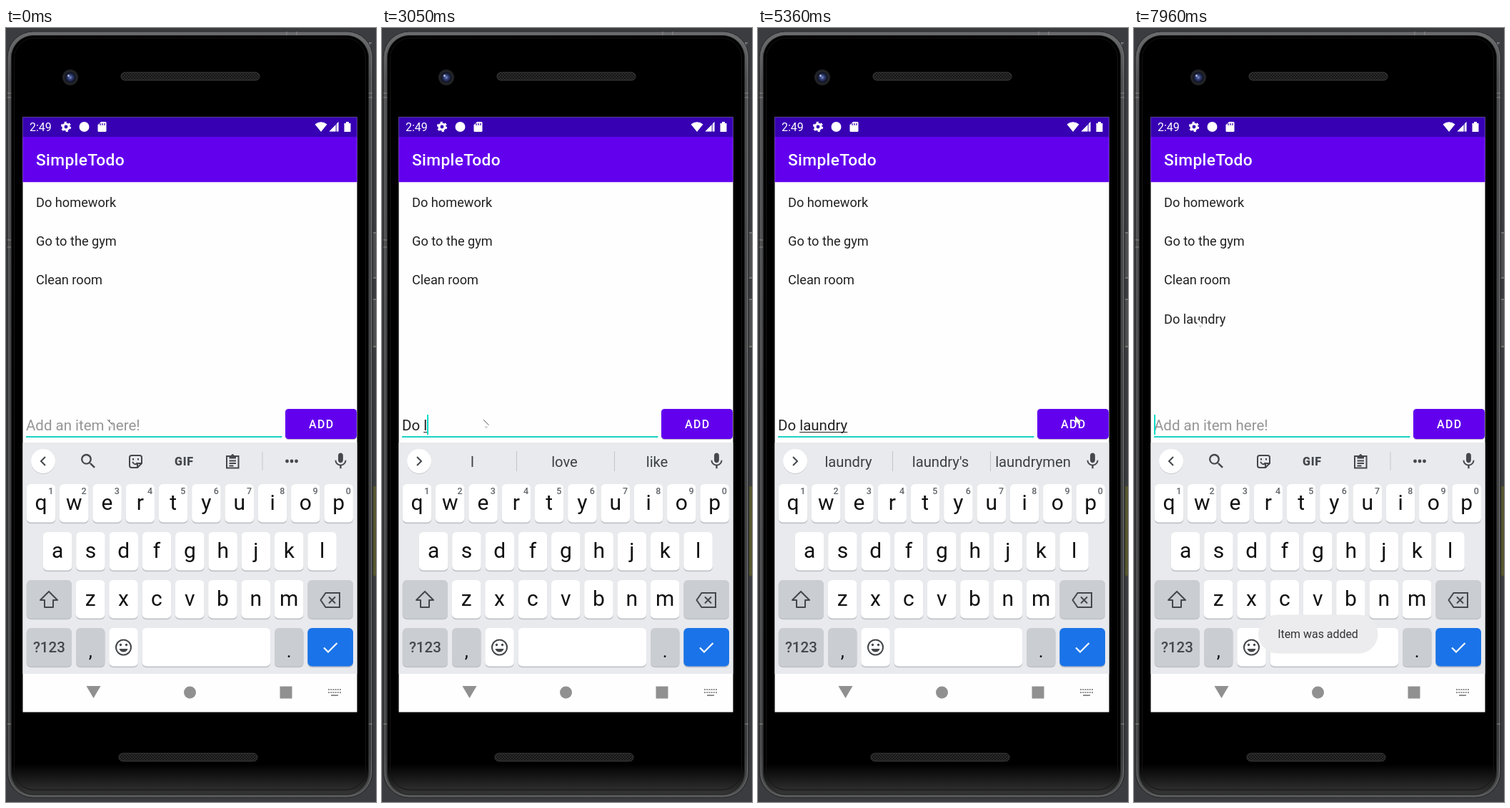
An HTML page for the animation above (8 s loop, 518 px wide and 1081 px high).

```html
<!DOCTYPE html>
<html lang="en">
<head>
<meta charset="utf-8">
<title>Todo list</title>
<style>
html, body { margin: 0; width: 100%; height: 100%; overflow: hidden; background: #3b3c3f; }
#stage { position: absolute; left: 0; top: 0; width: 518px; height: 1081px; overflow: hidden; font-family: Roboto, sans-serif; }
svg { position: absolute; left: 0; top: 0; }
text { font-family: Roboto, sans-serif; }
.mid { text-anchor: middle; }
.line { fill: none; stroke: #44474b; stroke-width: 2; }
#field { position: absolute; left: 28px; top: 541px; font-size: 20.48px; line-height: 28px; color: #212121; white-space: pre; }
#field u { text-decoration-thickness: 1px; text-underline-offset: 2px; text-decoration-skip-ink: none; }
#hint { position: absolute; left: 0; top: 0; color: #959595; }
#caret { position: absolute; top: -1px; width: 2px; height: 28px; background: #03dac5; }
</style>
</head>
<body>
<div id="stage">
<svg width="518" height="1081" viewBox="0 0 518 1081">
  <defs>
    <linearGradient id="metal" x2="0" y2="1">
      <stop offset="0" stop-color="#6c6d6e"/><stop offset=".06" stop-color="#4c4d4e"/>
      <stop offset=".5" stop-color="#424344"/><stop offset=".94" stop-color="#3a3b3c"/>
      <stop offset="1" stop-color="#4c4d4e"/>
    </linearGradient>
    <linearGradient id="glass" x2="0" y2="1">
      <stop offset=".96" stop-color="#000"/><stop offset="1" stop-color="#363636"/>
    </linearGradient>
    <radialGradient id="lens">
      <stop offset="0" stop-color="#7a8cc4"/><stop offset=".45" stop-color="#2c3a70"/><stop offset="1" stop-color="#0c0d16"/>
    </radialGradient>
    <pattern id="mesh" width="4" height="4" patternUnits="userSpaceOnUse">
      <rect width="4" height="4" fill="#161616"/><path d="M0 0L4 4M4 0L0 4" stroke="#333" stroke-width=".7"/>
    </pattern>
    <clipPath id="btnClip"><rect x="391" y="532" width="100" height="42" rx="4.5"/></clipPath>
  </defs>

  <!-- phone body -->
  <path d="M514 640h4v125h-4z" fill="#55552f"/>
  <text x="499" y="28" font-size="15" fill="#8d8f9a">ur</text>
  <path d="M512 285h6v65h-6zM512 378h6v68h-6z" fill="#4e4e4e"/>
  <path d="M514 286h4M514 349h4M514 379h4M514 445h4" stroke="#999"/>
  <rect x="2" y="5" width="511.500" height="1070" rx="36" fill="url(#metal)" stroke="#29292a"/>
  <rect x="4" y="7" width="507.500" height="1066" rx="34" fill="none" stroke="#6a6b6c"/>
  <path d="M2 91h6M2 97h6M507 91h6M507 97h6M393 5v5M407 5v5M2 296h6M2 306h6M2 972h6M507 972h6" stroke="#8a8a8a"/>
  <rect x="7.500" y="10.500" width="500" height="1060" rx="31" fill="url(#glass)" stroke="#222"/>
  <rect x="11.500" y="14" width="492" height="1050" rx="28" fill="none" stroke="#151515"/>
  <circle cx="90" cy="69" r="11" fill="#222327"/><circle cx="90" cy="69" r="7.500" fill="url(#lens)"/>
  <circle cx="87.500" cy="66.500" r="1.500" fill="#b4c0dc"/>
  <g fill="url(#mesh)" stroke="#3d3d3d">
    <rect x="161" y="62" width="194" height="11" rx="5.500"/><rect x="158" y="1013" width="194" height="11" rx="5.500"/>
  </g>

  <!-- app -->
  <path d="M23.500 124.500h468v831h-468z" fill="#fefefe"/>
  <path d="M23.500 124.500h468v28h-468z" fill="#3700b3"/>
  <path d="M23.500 152h468v63.300h-468z" fill="#6200ee"/>
  <g fill="#fff">
    <text x="33" y="144" font-size="16">2:49</text>
    <circle cx="84" cy="138" r="4" fill="none" stroke="#fff" stroke-width="3.200"/>
    <circle cx="84" cy="138" r="6.200" fill="none" stroke="#fff" stroke-width="2" stroke-dasharray="3.250"/>
    <circle cx="109.500" cy="138" r="7"/>
    <path d="M133 131h6q1.500 0 1.500 1.500v11q0 1.500-1.500 1.500h-9q-1.500 0-1.500-1.500V135.500z"/>
    <path d="M432.500 134.500Q441 128 449.500 134.500L441 145zM473.500 133h2.500v-2h4v2h2.500v12h-9z"/>
    <path d="M452.500 144.500L465.500 131v13.500z" fill-opacity=".35"/><path d="M452.500 144.500l9-9.300v9.300zM463 133.500l2.500-2.500v13.500H463z"/>
    <text x="42" y="192" font-size="22.750" font-weight="500" letter-spacing=".35">SimpleTodo</text>
  </g>
  <path d="M132 133v3M135 133v3M138 133v3" stroke="#3700b3" stroke-width="1.200"/>
  <g id="list" font-size="18.200" fill="#212121"></g>

  <!-- entry row -->
  <rect x="28" y="570" width="358.500" height="2" fill="#1bd2c3"/>
  <rect id="lift" x="392" y="536" width="99" height="41" rx="5" fill="#000" fill-opacity=".2"/>
  <rect x="391" y="533" width="100" height="42" rx="4.500" fill="#000" fill-opacity=".25"/>
  <rect x="391" y="532" width="100" height="42" rx="4.500" fill="#6200ee"/>
  <circle id="ripple" cx="444" cy="545" fill="#fff" clip-path="url(#btnClip)"/>
  <text x="424" y="559" font-size="15.930" font-weight="500" letter-spacing="1.420" fill="#fff">ADD</text>

  <!-- keyboard -->
  <path d="M23.500 579h468v323h-468z" fill="#e8eaed"/>
  <circle cx="52" cy="606" r="17" fill="#c9cbcf"/><circle cx="52" cy="605" r="17" fill="#fff"/>
  <path id="chevron" class="line"/>
  <g id="tools">
    <path transform="translate(101.600 591.500) scale(1.138)" fill="#44474b" d="M15.500 14h-.8l-.3-.27A6.500 6.500 0 1 0 13.700 14.400l.3.300v.8l5 5L20.500 19zM9.500 14a4.500 4.500 0 1 1 0-9 4.500 4.500 0 0 1 0 9z"/>
    <path d="M176 597h11q3 0 3 3v8l-6 6h-8q-3 0-3-3v-11q0-3 3-3zM190 608h-4q-2 0-2 2v4M177 606q4 6 7 1" class="line"/>
    <path d="M177 601h2v2.500h-2zM184 601h2v2.500h-2z" fill="#44474b"/>
    <text x="249.400" y="610.500" font-size="16" font-weight="800" letter-spacing=".8" class="mid" fill="#44474b">GIF</text>
    <path d="M309 598h16.500v16.500H309zM312.500 604.500h9.500M312.500 608h9.500M312.500 611.500h6" class="line"/>
    <path d="M312.500 597h2.500q2-4 4.500 0h2.500v4.500h-9.500z" fill="#44474b"/>
    <path d="M359 592v26" stroke="#c6c8cc"/>
    <path d="M393.500 605h.01M400 605h.01M406.500 605h.01" stroke="#44474b" stroke-width="4.800" stroke-linecap="round"/>
  </g>
  <g id="words" font-size="20.200" fill="#3c4043">
    <path d="M188.500 591v28M325.500 591v28" stroke="#c3c5c9"/>
    <text x="126.500" y="613" class="mid"></text><text x="255.500" y="613" class="mid"></text><text x="385" y="613" class="mid"></text>
  </g>
  <path transform="translate(454.800 591.300) scale(1.138)" fill="#44474b" d="M12 14c1.660 0 3-1.340 3-3V5c0-1.660-1.340-3-3-3S9 3.340 9 5v6c0 1.660 1.340 3 3 3zm5.300-3c0 3-2.540 5.100-5.300 5.100S6.700 14 6.700 11H5c0 3.410 2.720 6.230 6 6.720V21h2v-3.280c3.280-.48 6-3.300 6-6.720z"/>
  <g id="keys"></g>
  <path d="M60 787l12 12h-6v10H54v-10h-6z" class="line" stroke-linejoin="round"/>
  <path d="M447.500 789H467v20h-19.500l-7-10zM452 794.500l9 9M461 794.500l-9 9" class="line"/>
  <circle cx="164.500" cy="865" r="10.500" class="line"/>
  <path d="M158.500 867h12q-1.500 4.500-6 4.500t-6-4.500z" fill="#44474b"/>
  <circle cx="160.500" cy="861.500" r="1.700" fill="#44474b"/><circle cx="168.500" cy="861.500" r="1.700" fill="#44474b"/>
  <path d="M445 865.500l6 6 12.500-12.500" fill="none" stroke="#fff" stroke-width="2.200"/>

  <!-- navigation -->
  <g fill="#909090">
    <path d="M112.500 919h20l-10 17z"/><circle cx="257.500" cy="928" r="8.500"/><path d="M383.500 919.500h17v17h-17z"/>
  </g>
  <path d="M451 924h18M451 928h18" stroke="#909090" stroke-width="2" stroke-dasharray="2 1.200"/>
  <path d="M455 932h10" stroke="#909090" stroke-width="2"/>

  <g id="toast">
    <rect x="174" y="819.500" width="167.500" height="54" rx="27" fill="#ececee"/>
    <text x="257.500" y="852" font-size="15.930" class="mid" fill="#333">Item was added</text>
  </g>
</svg>
<div id="field"><span id="hint">Add an item here!</span><span id="done"></span><u id="word"></u><span id="gap"></span><span id="caret"></span></div>
<svg width="518" height="1081">
  <g id="mouse">
    <path d="M0 0V11L2.500 8.800 4.200 12.500 6 11.700 4.500 8.200H8z" fill="#fff"/>
    <path d="M.5 .5L8 8.200" stroke="#4a4a4a" stroke-width=".9"/>
    <path d="M3 9.500l1 2M5 9.500l1 1.500M4 12h1.500" stroke="#aaa" stroke-width=".9"/>
  </g>
</svg>
</div>
<script>
const $ = id => document.getElementById(id);
const show = (el, on) => { el.style.display = on ? '' : 'none'; };

['Do homework', 'Go to the gym', 'Clean room', 'Do laundry'].forEach((s, i) => {
  $('list').innerHTML += `<text x="42" y="${249.55 + i * 54.4}">${s}</text>`;
});
const added = $('list').lastChild;

function key(x, y, w, fill = '#fff', label = '', size = 30, dy = 36) {
  return `<rect x="${x}" y="${y + 1.2}" width="${w}" height="54" rx="6" fill="#bfc2c6"/>
    <rect x="${x}" y="${y}" width="${w}" height="53.5" rx="6" fill="${fill}"/>
    <text x="${x + w / 2}" y="${y + dy}" class="mid" font-size="${size}" fill="#111">${label}</text>`;
}
const STEP = 46.3, W = 40.5, GREY = '#cacdd2';
let board = '';
[['qwertyuiop', 28.7, 637], ['asdfghjkl', 51.9, 704], ['zxcvbnm', 98, 771]].forEach(([row, x0, y], r) => {
  [...row].forEach((c, i) => {
    board += key(x0 + i * STEP, y, W, '#fff', c);
    if (!r) board += `<text x="${x0 + i * STEP + 34}" y="651" class="mid" font-size="12.5" font-weight="500" fill="#5f6368">${(i + 1) % 10}</text>`;
  });
});
board += key(28.7, 771, 63.3, GREY) + key(422.3, 771, 63.7, GREY)
  + key(28.7, 838, 63.3, GREY, '<tspan font-weight="500" fill="#44474b">?123</tspan>', 20.5, 34)
  + key(98, 838, W, GREY, ',', 26, 41) + key(144.3, 838, W)
  + key(190.6, 838, 179.5) + key(376, 838, W, GREY, '.', 26, 41) + key(422.3, 838, 63.7, '#1a73e8');
$('keys').innerHTML = board;

// Each track is a list of [start, value...]; values hold until the next start.
const tracks = {
  // finished text, underlined word, trailing space
  text: [[0, '', '', ''], [1670, '', 'D', ''], [1950, '', 'Do', ''], [2230, '', 'Do', ' '], [2510, 'Do ', '', ''],
    [2780, 'Do ', 'l', ''], [3350, 'Do ', 'la', ''], [3500, 'Do ', 'lau', ''], [3650, 'Do ', 'laun', ''],
    [4080, 'Do ', 'laund', ''], [4210, 'Do ', 'laundr', ''], [4340, 'Do ', 'laundry', ''], [5790, '', '', '']],
  words: [[0], [1820, 'D', 'Do', 'Did'], [2090, 'Do', 'So', "Don't"], [2510, 'you', 'not', 'it'], [3050, 'l', 'love', 'like'],
    [3500, 'la', 'last', 'late'], [3650, 'lau', 'laundry', 'lay'], [3780, 'laun', 'laundry', 'launch'],
    [4210, 'laund', 'laundry', 'laundrymen'], [4640, 'laundry', "laundry's", 'laundrymen'], [6210]],
  caret: [[0, 0], [150, 1], [630, 0], [1230, 1], [5080, 0], [5510, 1], [6510, 0], [6950, 1], [7390, 0], [7960, 1]],
  mouse: [[0, 141.5, 546.5], [5080, 205, 549], [5220, 365, 545], [5360, 444, 541.5], [5930, 418, 460], [6060, 371, 374.5],
    [6210, 336, 425], [6360, 316, 459.5], [6510, 332, 472], [6660, 343, 478], [7250, 310, 465], [7390, 235, 440],
    [7530, 160, 422], [7680, 115, 412], [7820, 94, 407], [7960, 88.5, 405.5]],
  ripple: [[0, 0, 0], [5510, 30, .2], [5650, 70, .24], [5930, 110, .2], [6060, 110, .14], [6210, 0, 0]],
  item: [[0, 0], [6060, .2], [6210, 1]],
  toast: [[0, 0], [6210, .5], [6360, 1]]
};
const at = (name, t) => tracks[name].findLast(s => s[0] <= t).slice(1);

function draw(t) {
  const [done, word, gap] = at('text', t);
  $('done').textContent = done;
  $('word').textContent = word;
  $('gap').textContent = gap;
  show($('hint'), !(done + word));
  show($('caret'), at('caret', t)[0]);

  const words = at('words', t), typing = words.length > 0;
  show($('words'), typing);
  show($('tools'), !typing);
  $('words').querySelectorAll('text').forEach((el, i) => { el.textContent = words[i] || ''; });
  $('chevron').setAttribute('d', typing ? 'M49 599l6 6-6 6' : 'M55 599l-6 6 6 6');

  const [mx, my] = at('mouse', t);
  $('mouse').setAttribute('transform', `translate(${mx} ${my})`);
  const [r, alpha] = at('ripple', t);
  $('ripple').setAttribute('r', r);
  $('ripple').setAttribute('opacity', alpha);
  show($('lift'), r);
  added.setAttribute('opacity', at('item', t)[0]);
  $('toast').setAttribute('opacity', at('toast', t)[0]);
}

function tick() {
  draw(performance.now() % 8000);
  requestAnimationFrame(tick);
}
tick();
</script>
</body>
</html>
```
